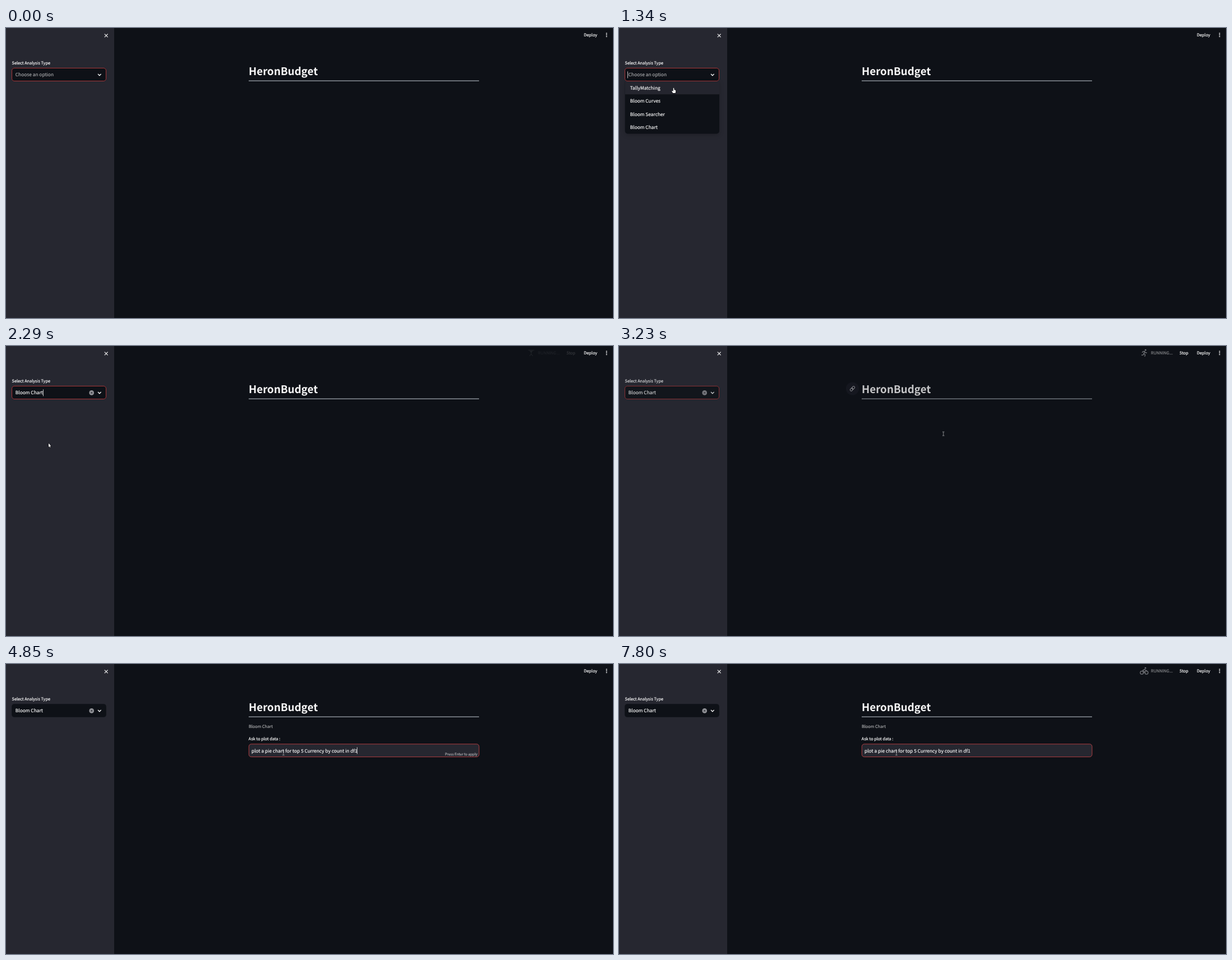
These frames come from a looping animation (1083x517 px, 8000 ms). An HTML page with a canvas:

```html
<!DOCTYPE html>
<html lang="en">
<head>
<meta charset="utf-8">
<title>HeronBudget</title>
<style>
  html, body { margin: 0; width: 100%; height: 100%; overflow: hidden; background: #0e1117; }
  canvas { display: block; width: 1083px; height: 517px; }
</style>
</head>
<body>
<canvas id="stage" width="1083" height="517"></canvas>
<script>
const ctx = document.getElementById('stage').getContext('2d');
const LOOP = 8000;
const BG = '#0e1117', PANEL = '#262730', TEXT = '#fafafa', MUTED = 'rgba(250,250,250,.6)', RED = '#ff4b4b';
const FONTS = '"Noto Sans CJK JP", "Noto Sans CJK SC", "Noto Sans CJK", "Open Sans", sans-serif';
const BODY = 9.33, SMALL = 8.16, TINY = 7, HEADING = 21;

const APP = 'HeronBudget';
const OPTIONS = ['TallyMatching', 'Bloom Curves', 'Bloom Searcher', 'Bloom Chart'];
const CHOICE = OPTIONS[3];
const QUERY = 'plot a pie chart for top 5 Currency by count in df1';

// Moments in ms
const ENTER = 250, OPEN = 1060, PICK = 2210, LOADED = 3700, READY = 3770,
      FOCUS = 3840, PASTE = 4850, SUBMIT = 6050, REFRESHED = 7200;

const PATH = [
  [250, 391, 461], [930, 42, 82], [1060, 42, 82], [1340, 97.5, 107], [1810, 80, 163],
  [1950, 76, 173.5], [2700, 76, 173.5], [2960, 130, 174], [3030, 300, 202],
  [3110, 440, 196], [3230, 579, 156.5], [3640, 495, 159]
];

// Sport figures around their own centre: head position, then limbs
const POSES = [
  { head: [0, -4.8], limbs: 'M-4.6-2.3H4.6M0-2V1.5M-1 1V6.2M1 1V6.2' },
  { head: [2.4, -5.2], limbs: 'M1.3-3L-.6 1L1.8 3L1 6.5M-.6 1L-2 3.8H-5M1.3-3L-2.2-2.6L-3.6-.4M1.2-2L2.8-.2L5-.6' },
  { head: [0, -3], limbs: 'M-5.5-5H5.5M-3.2-4.8L0-.8L3.2-4.8M0-.8V2L-3 5.5M0 2L3 5.5' },
  { head: [2.2, -5.2], limbs: 'M-1.4 3a2.8 2.8 0 1 1-5.6 0a2.8 2.8 0 1 1 5.6 0M7 3a2.8 2.8 0 1 1-5.6 0a2.8 2.8 0 1 1 5.6 0M1-3L-2.5-1L.5 1L-.5 4M1-3L2.5-1H4.6' },
  { head: [0, -4.8], limbs: 'M-4-5.5L0-2.2L4-5.5M0-2.2V1.5L-3.4 6M0 1.5L3.4 6' },
  { head: [-2, -5], limbs: 'M-1.5-3L-.5 1L-1 6.3M-.5 1L5 0M-1.5-3L-4.5-1M-1.5-3L2-2' }
].map(p => ({ head: p.head, limbs: new Path2D(p.limbs) }));

const HAND = new Path2D('M-.7 0Q0-.9.8 0V3L3 3.6Q4 4 3.8 5.5L3.2 9H-1.2L-3.2 5.8Q-3.2 4.6-2 5L-.8 6Z');
const ARROW = new Path2D('M0 0V6.4L1.5 5.2L2.4 7.3L3.5 6.9L2.6 4.7H4.4Z');

const clamp = v => Math.max(0, Math.min(1, v));
const ramp = (t, start, length) => clamp((t - start) / length);
const between = (t, a, b) => t >= a && t < b;
const blink = (t, start, period) => Math.floor((t - start) / period) % 2 === 0;

function setFont(size, weight = 400) {
  ctx.textRendering = 'geometricPrecision';
  ctx.font = `${weight} ${size / 1.117}px ${FONTS}`;
}

function text(str, x, y, size, color = TEXT, { weight, align = 'left' } = {}) {
  setFont(size, weight);
  ctx.textAlign = align;
  ctx.fillStyle = color;
  ctx.fillText(str, x, y);
  if (weight) return;
  // A hairline keeps small type from looking thin
  ctx.strokeStyle = color;
  ctx.lineWidth = 0.18;
  ctx.strokeText(str, x, y);
}

function textWidth(str, size) {
  setFont(size);
  return ctx.measureText(str).width;
}

function rect(x, y, w, h, color) {
  ctx.fillStyle = color;
  ctx.fillRect(x, y, w, h);
}

function rounded(x, y, w, h, radii, color) {
  ctx.beginPath();
  ctx.roundRect(x, y, w, h, radii);
  ctx.fillStyle = color;
  ctx.fill();
}

function disc(x, y, r, color) {
  ctx.beginPath();
  ctx.arc(x, y, r, 0, Math.PI * 2);
  ctx.fillStyle = color;
  ctx.fill();
}

function line(points, color, width) {
  ctx.beginPath();
  points.forEach(([x, y]) => ctx.lineTo(x, y));
  ctx.strokeStyle = color;
  ctx.lineWidth = width;
  ctx.stroke();
}

function cross(x, y, r, color, width) {
  line([[x - r, y - r], [x + r, y + r]], color, width);
  line([[x - r, y + r], [x + r, y - r]], color, width);
}

function faded(alpha, draw) {
  ctx.save();
  ctx.globalAlpha *= alpha;
  draw();
  ctx.restore();
}

function field(x, y, w, h, fill, focus) {
  rounded(x, y, w, h, 4.6, fill);
  if (!focus) return;
  faded(focus, () => {
    ctx.beginPath();
    ctx.roundRect(x + 0.3, y + 0.3, w - 0.6, h - 0.6, 4.4);
    ctx.strokeStyle = RED;
    ctx.lineWidth = 0.62;
    ctx.stroke();
  });
}

const caret = (x, y) => rect(Math.round(x), y, 1, 12, 'rgba(250,250,250,.75)');

// Content dims slowly while a run has not refreshed it
function staleAlpha(t) {
  const start = between(t, PICK, LOADED) ? PICK : between(t, SUBMIT, REFRESHED) ? SUBMIT : null;
  return start === null ? 1 : 1 - 0.67 * ramp(t, start + 500, 1000) ** 1.7;
}

function cursorAt(t) {
  let i = PATH.findIndex(p => p[0] > t);
  if (i < 0) i = PATH.length;
  const [t0, x0, y0] = PATH[i - 1];
  const [t1, x1, y1] = PATH[i] || [LOOP, x0, y0];
  const k = (t - t0) / (t1 - t0);
  return { x: x0 + (x1 - x0) * k, y: y0 + (y1 - y0) * k };
}

function drawHeader(t) {
  text('Deploy', 1031, 15, SMALL);
  for (const y of [9.4, 12.3, 15.2]) disc(1071.5, y, 0.98, TEXT);

  const first = between(t, PICK, READY), second = t >= SUBMIT;
  if (!first && !second) return;
  const start = first ? PICK : SUBMIT;
  const alpha = first ? ramp(t, 2270, 150) : ramp(t, SUBMIT, 110);
  const pose = POSES[(Math.floor((t - start) / 194) + (first ? 2 : 0)) % POSES.length];
  faded(alpha, () => {
    text('RUNNING...', 949, 15, SMALL, 'rgba(250,250,250,.45)');
    text('Stop', 1000, 15, SMALL);
    ctx.translate(937, 12.4);
    disc(pose.head[0], pose.head[1], 1.35, '#74767b');
    ctx.strokeStyle = '#74767b';
    ctx.lineWidth = 1.25;
    ctx.stroke(pose.limbs);
  });
}

function drawSidebar(t, alpha) {
  rect(0, 0, 193, 517, PANEL);
  cross(178.7, 13.5, 2.9, TEXT, 1.1);
  faded(alpha, () => {
    text('Select Analysis Type', 10.6, 65.1, SMALL);
    field(10.2, 71.2, 168.6, 23.6, BG, 1 - ramp(t, 3910, 130));
    line([[164, 82], [166.8, 84.8], [169.6, 82]], TEXT, 1.3);
    if (t < PICK) {
      text('Choose an option', 16.8, 86.4, BODY, MUTED);
      if (t >= OPEN && blink(t, OPEN, 530)) caret(15.3, 77.4);
    } else {
      text(CHOICE, 16.8, 86.4, BODY);
      disc(152.7, 83.4, 4.3, '#929398');
      cross(152.7, 83.4, 1.5, BG, 0.9);
      if (t < FOCUS && blink(t, PICK, 530)) caret(17.2 + textWidth(CHOICE, BODY), 77.4);
    }
  });
}

function drawMenu(cursor) {
  const rowHeight = 23.35;
  ctx.save();
  ctx.shadowColor = 'rgba(0,0,0,.2)';
  ctx.shadowBlur = 9;
  ctx.shadowOffsetY = 2.3;
  rounded(10.7, 95, 168.3, rowHeight * 4, [0, 0, 4.6, 4.6], BG);
  ctx.restore();
  const hover = Math.floor((cursor.y - 95) / rowHeight);
  OPTIONS.forEach((name, i) => {
    const y = 95 + i * rowHeight;
    if (i === hover) rounded(10.7, y, 168.3, rowHeight, i === 3 ? [0, 0, 4.6, 4.6] : 0, '#24252e');
    text(name, 19.8, y + 15, BODY);
  });
}

function drawAnchor() {
  disc(416.5, 76, 11.6, '#171a21');
  ctx.save();
  ctx.translate(416.5, 76);
  ctx.rotate(-Math.PI / 4);
  ctx.strokeStyle = '#a5a6aa';
  ctx.lineWidth = 1;
  for (const x of [-5, -0.6]) {
    ctx.beginPath();
    ctx.roundRect(x, -2, 5.6, 4, 2);
    ctx.stroke();
  }
  ctx.restore();
}

function drawMain(t, alpha) {
  faded(alpha, () => {
    text(APP, 433, 84, HEADING, TEXT, { weight: 600 });
    rect(433, 93.6, 411, 1.1, '#b4bcc3');
    if (between(t, 3110, LOADED)) drawAnchor();
    if (t < LOADED) return;

    text(CHOICE, 433, 113.6, SMALL, MUTED);
    text('Ask to plot data :', 432.8, 136, SMALL);
    field(433, 142.4, 411.3, 23.5, PANEL, ramp(t, 3910, 130));
    const typed = t >= PASTE;
    if (typed) text(QUERY, 438, 157.5, BODY);
    if (between(t, PASTE, SUBMIT)) text('Press Enter to apply', 841, 162.8, TINY, MUTED, { align: 'right' });
    if (typed ? blink(t, PASTE, 522) : between(t, FOCUS, 4440)) {
      caret(438 + (typed ? textWidth(QUERY, BODY) - 0.8 : 0), 148.4);
    }
  });
}

function drawCursor(t, { x, y }) {
  ctx.save();
  ctx.translate(x, y);
  if (x > 433 && t > 3000) {
    line([[0, -3.2], [0, 3.2]], '#a4a5a8', 0.8);
    for (const side of [-3.4, 3.4]) line([[-1.8, side], [1.8, side]], '#a4a5a8', 0.8);
  } else {
    const overSelect = x < 179 && (t < OPEN ? y < 95 : t < PICK);
    const shape = overSelect ? HAND : ARROW;
    ctx.strokeStyle = '#000';
    ctx.lineWidth = 1;
    ctx.stroke(shape);
    ctx.fillStyle = '#fff';
    ctx.fill(shape);
  }
  ctx.restore();
}

function draw(t) {
  const alpha = staleAlpha(t);
  const cursor = t >= ENTER ? cursorAt(t) : null;
  rect(0, 0, 1083, 517, BG);
  drawSidebar(t, alpha);
  drawMain(t, alpha);
  drawHeader(t);
  if (between(t, OPEN, PICK)) drawMenu(cursor);
  if (cursor) drawCursor(t, cursor);
}

const origin = performance.now();
function frame() {
  draw((performance.now() - origin) % LOOP);
  requestAnimationFrame(frame);
}
frame();
</script>
</body>
</html>
```
